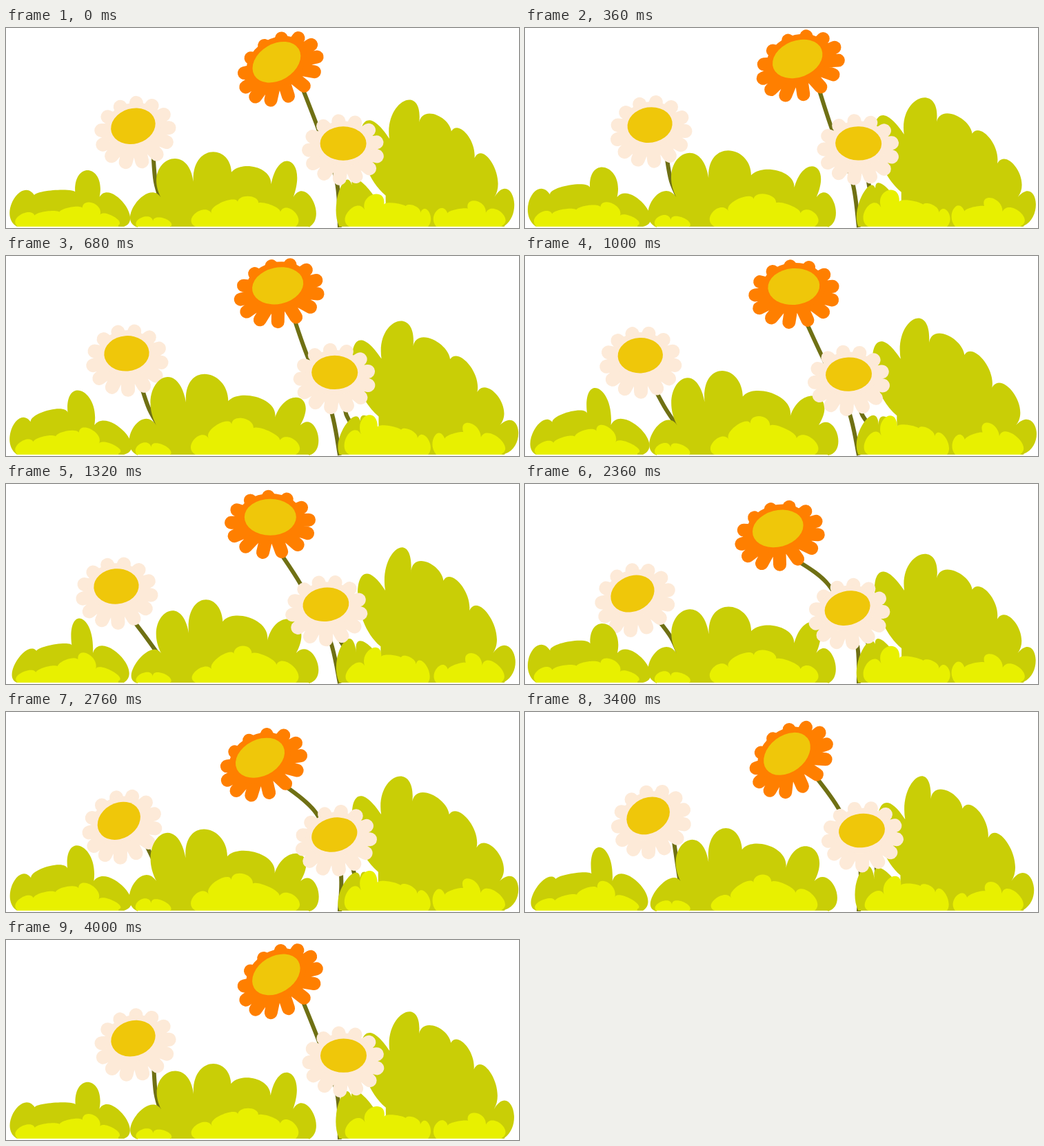
These frames come from a looping animation (744 px wide and 291 px high, 4.04 s). An HTML page:

```html
<!DOCTYPE html>
<html lang="en">
<head>
<meta charset="utf-8">
<title>Swaying flowers</title>
<style>
html, body { margin: 0; width: 100%; height: 100%; overflow: hidden; background: #fff; }
svg { display: block; width: 744px; height: 291px; }
</style>
</head>
<body>
<svg id="stage" viewBox="0 0 744 291"></svg>
<script>
const LOOP = 4040, STEP = 40, GROUND = 289;
const GREEN = '#c9ce06', LIME = '#e8f000', STEM = '#6f7014';
const CREAM = '#fdead8', GOLD = '#efc70a', ORANGE = '#ff7f00';
const stage = document.getElementById('stage');
const rad = degrees => degrees * Math.PI / 180;

function add(tag, attrs, parent = stage) {
  const el = document.createElementNS('http://www.w3.org/2000/svg', tag);
  for (const name in attrs) el.setAttribute(name, attrs[name]);
  return parent.appendChild(el);
}

// Lobe tips between the two feet. A wave of "rate" degrees per pixel crosses
// the bush; lobes at "crest" lead it. "dip" is the depth between lobes.
const bushes = [
  { color: GREEN, crest: 112, rate: 1.1, dip: 14,
    points: [[16, 289], [13, 250], [65, 232], [113, 200], [168, 252], [171, 289]] },
  { color: GREEN, crest: 275, rate: 0.95, dip: 35,
    points: [[191, 290], [188, 254], [230, 187], [297, 174], [351, 199], [416, 199], [449, 255], [439, 290]] },
  { color: GREEN, crest: 570, rate: 0.75, dip: 20,
    points: [[545, 238], [509, 151], [571, 99], [623, 123], [664, 150], [704, 194], [738, 248], [723, 288]] },
  { color: GREEN, crest: 720, rate: 1, dip: 8,
    points: [[483, 288], [489, 236], [528, 236], [550, 288]] },
  { color: LIME, crest: 95, rate: 1.5, dip: 6,
    points: [[16, 288], [24, 271], [58, 265], [90, 257], [122, 251], [154, 273], [163, 287]] },
  { color: LIME, crest: 260, rate: 1, dip: 4,
    points: [[191, 290], [196, 275], [229, 276], [238, 290]] },
  { color: LIME, crest: 345, rate: 1.2, dip: 6,
    points: [[275, 289], [275, 269], [312, 249], [347, 239], [378, 253], [417, 266], [420, 289]] },
  { color: LIME, crest: 575, rate: 1, dip: 6,
    points: [[498, 289], [497, 265], [529, 238], [564, 251], [587, 254], [611, 265], [612, 289]] },
  { color: LIME, crest: 700, rate: 1, dip: 6,
    points: [[624, 289], [624, 265], [654, 261], [676, 247], [715, 265], [719, 288]] }
];

// Every sway is [middle, reach, phase in degrees] of one swing per loop.
// "neck" is where the stem meets the head, in the head's own axes.
const flowers = [
  { petal: ORANGE, rx: 37.5, ry: 26.5, ring: [57, 41], drop: 11, width: 19, phase: 101,
    x: [381, 14.3, 37], y: [55, 11.7, 243], tilt: [-18.5, 19, 131], neck: [13, 50],
    joints: [{ y: 147, x: [443, 15.4, -50] }, { y: 222, x: [477, 9, -75] }], base: [484, 290] },
  { petal: CREAM, rx: 32.7, ry: 25.7, ring: [50, 43], drop: 10, width: 20, phase: 92,
    x: [168.7, 15.8, -6], y: [150.3, 9.3, 216], tilt: [-16.7, 14, 87], neck: [17, 46],
    joints: [{ y: 223, x: [212, 9, -58] }], base: [226, 255] },
  { petal: CREAM, rx: 33.5, ry: 24.7, ring: [50, 42], drop: 9, width: 20, phase: 96,
    x: [475.8, 14.8, -26], y: [174.2, 6.5, 198], tilt: [-6.7, 8, 32], neck: [16, 35],
    joints: [{ y: 230, x: [498, 12, -53] }], base: [512, 262] }
];

function buildHead(flower) {
  const petals = 13, { ring: [ringX, ringY], drop, rx, ry, petal } = flower;
  flower.head = add('g', {});
  let rays = '';
  for (let i = 0; i < petals; i++) {
    const a = rad(flower.phase + i * 360 / petals);
    rays += `M0 ${drop / 2}L${ringX * Math.cos(a)} ${drop + ringY * Math.sin(a)}`;
  }
  add('path', { d: rays, stroke: petal, 'stroke-width': flower.width, 'stroke-linecap': 'round' }, flower.head);
  add('ellipse', { rx: rx + 9, ry: ry + 8, fill: petal }, flower.head);
  add('ellipse', { rx, ry, fill: GOLD }, flower.head);
}

const [orange, left, right] = flowers;
for (const f of flowers) f.stem = add('path', { fill: 'none', stroke: STEM, 'stroke-width': 6 });
buildHead(orange);
buildHead(left);
for (const bush of bushes) bush.path = add('path', { fill: bush.color });
buildHead(right);

const sway = ([middle, reach, phase], t) => middle + reach * Math.cos(2 * Math.PI * t / LOOP - rad(phase));

// Bushes swing twice per loop along a diagonal, more strongly higher up.
function ripple([x, y], bush, t) {
  const reach = 7 * Math.min(1, Math.max(0, GROUND - y) / 60);
  const shift = reach * Math.cos(4 * Math.PI * t / LOOP - rad(bush.rate * (x - bush.crest)));
  return [x + shift, y + shift];
}

// The notch between two lobes leans towards the higher one.
function notch([ax, ay], [bx, by], dip) {
  const depth = Math.max(ay, by) + dip - 0.3 * Math.abs(ay - by);
  const floor = GROUND - 43;
  return [(ax + bx) / 2 + 0.2 * (ay - by), dip > 10 ? Math.min(depth, floor) : depth];
}

// A dome from a to b whose middle is the tip.
function dome([ax, ay], [tx, ty], [bx, by]) {
  const bulge = 0.2;
  const dx = (tx - (ax + bx) / 2) * 4 / 3, dy = (ty - (ay + by) / 2) * 4 / 3;
  const sx = (bx - ax) * bulge, sy = (by - ay) * bulge;
  return `C${ax + dx - sx} ${ay + dy - sy} ${bx + dx + sx} ${by + dy + sy} ${bx} ${by}`;
}

function bushPath(bush, t) {
  const p = bush.points.map(point => ripple(point, bush, t));
  const last = p.length - 1;
  let from = p[0], d = `M${from}`;
  for (let i = 1; i < last; i++) {
    const to = i + 1 < last ? notch(p[i], p[i + 1], bush.dip) : p[last];
    d += dome(from, p[i], to);
    from = to;
  }
  return `${d}V${GROUND}H${p[0][0]}Z`;
}

// Smooth curve through all points.
function curve(points) {
  const at = i => points[Math.min(Math.max(i, 0), points.length - 1)];
  const handle = (i, sign) => [0, 1].map(k => at(i)[k] + sign * (at(i + 1)[k] - at(i - 1)[k]) / 6);
  let d = `M${points[0]}`;
  for (let i = 1; i < points.length; i++) d += `C${handle(i - 1, 1)} ${handle(i, -1)} ${points[i]}`;
  return d;
}

function render(t) {
  for (const bush of bushes) bush.path.setAttribute('d', bushPath(bush, t));
  for (const f of flowers) {
    const x = sway(f.x, t), y = sway(f.y, t), tilt = sway(f.tilt, t);
    const c = Math.cos(rad(tilt)), s = Math.sin(rad(tilt)), [nx, ny] = f.neck;
    const top = [x + nx * c - ny * s, y + nx * s + ny * c];
    const joints = f.joints.map(j => [sway(j.x, t), j.y]);
    f.head.setAttribute('transform', `translate(${x} ${y}) rotate(${tilt})`);
    f.stem.setAttribute('d', curve([top, ...joints, f.base]));
  }
}

const start = performance.now();
function tick() {
  const t = (performance.now() - start) % LOOP;
  render(Math.floor(t / STEP) * STEP);
  requestAnimationFrame(tick);
}
tick();
</script>
</body>
</html>
```
